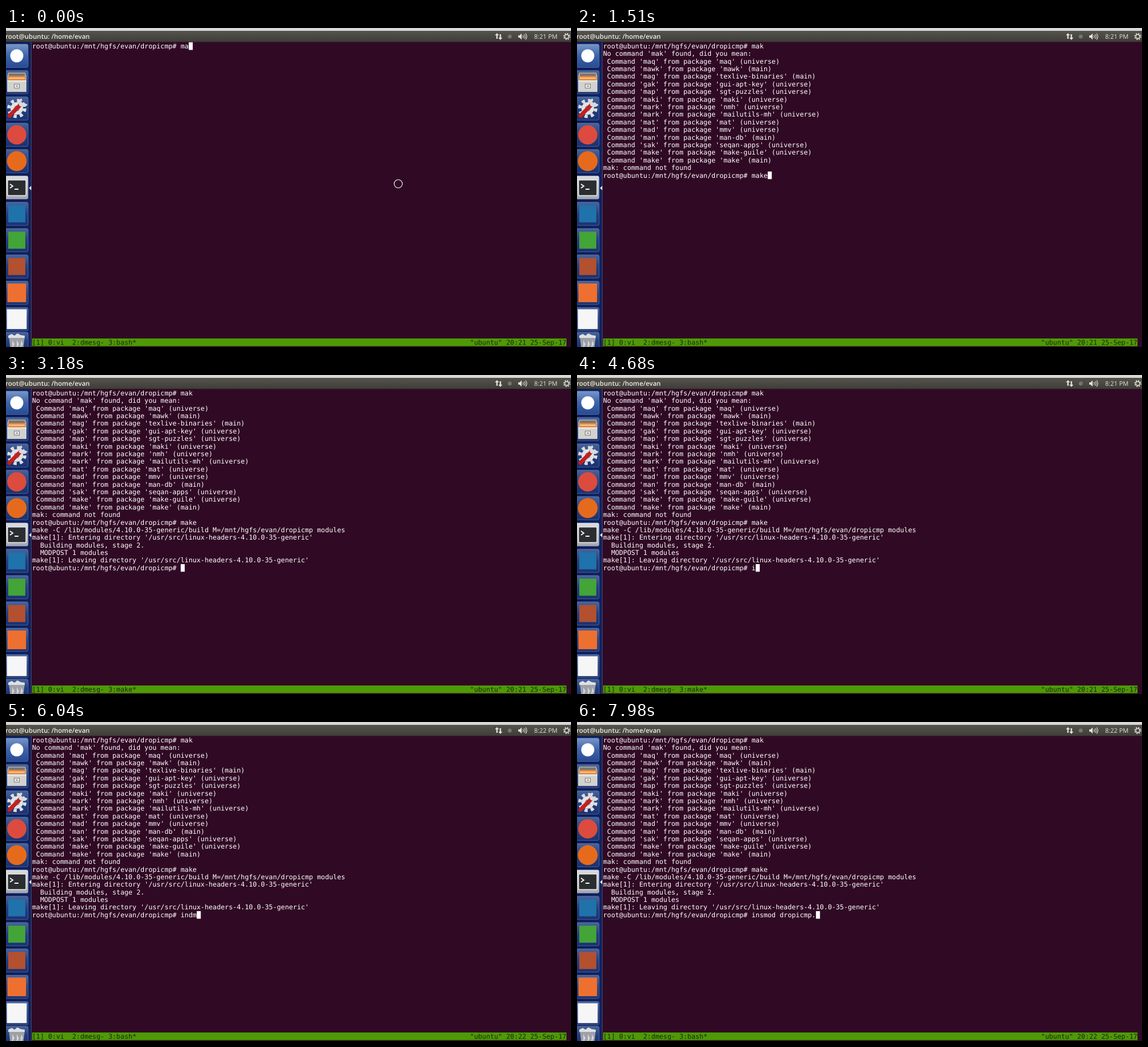
These frames come from a looping animation (996x562 px, 8000 ms). An HTML page:

```html
<!DOCTYPE html>
<html lang="en">
<head>
<meta charset="utf-8">
<title>Terminal session</title>
<style>
  html, body { margin: 0; width: 100%; height: 100%; overflow: hidden; background: #300a24; }
  svg { display: block; width: 996px; height: 562px; }
  text { white-space: pre; text-rendering: geometricPrecision; }
  .term text { font: 11.76px "DejaVu Sans Mono", monospace; fill: #fff; }
  .term .bar { fill: #17280a; }
  .panel text { font: 11px "Open Sans", sans-serif; fill: #e4e0d8; }
  .panel .title { font-size: 11.55px; font-weight: 600; fill: #f0ede6; }
</style>
</head>
<body>
<svg viewBox="0 0 996 562">
  <defs>
    <linearGradient id="top" x2="0" y2="1">
      <stop stop-color="#55534d"/><stop offset="1" stop-color="#3e3d38"/>
    </linearGradient>
    <linearGradient id="dock">
      <stop stop-color="#0b1c58"/><stop offset="1" stop-color="#10225f"/>
    </linearGradient>
    <linearGradient id="tile" x2="0" y2="1">
      <stop stop-color="#48649d"/><stop offset=".5" stop-color="#233f80"/><stop offset="1" stop-color="#1a3272"/>
    </linearGradient>
    <linearGradient id="blue" x2="0" y2="1">
      <stop stop-color="#7896c8"/><stop offset=".5" stop-color="#3c63a8"/><stop offset="1" stop-color="#274b94"/>
    </linearGradient>
    <linearGradient id="pale" x2="0" y2="1">
      <stop stop-color="#dcdde2"/><stop offset="1" stop-color="#a3a6b0"/>
    </linearGradient>
  </defs>

  <rect width="996" height="562" fill="#300a24"/>
  <rect width="996" height="5" fill="#d8d8d8"/>

  <g class="panel">
    <rect y="5" width="996" height="19.5" fill="url(#top)"/>
    <text class="title" x="-1" y="18.6">root@ubuntu: /home/evan</text>
    <text id="clock" x="931" y="18.8"></text>
    <g fill="#e4e0d8">
      <path d="M865.5 9l3.6 4h-2.4v6h-2.4v-6h-2.4zM871.5 21l-3.6-4h2.4v-6h2.4v6h2.4z"/>
      <path d="M903 13h2.5l3.5-3.5v11l-3.5-3.5h-2.5z"/>
      <circle cx="888" cy="15" r="3.5" fill="#77756e"/>
    </g>
    <g fill="none" stroke="#e4e0d8">
      <path d="M911 12.5q2 2.5 0 5M913.5 11q3.2 4 0 8M916 9.5q4.200 5.500 0 11" stroke-width="1.2"/>
      <circle cx="988.5" cy="15" r="3.4" stroke-width="1.5"/>
      <circle cx="988.5" cy="15" r="5.2" stroke-width="1.900" stroke-dasharray="2.042"/>
    </g>
  </g>

  <g id="launcher">
    <rect y="24.500" width="44" height="537.500" fill="url(#dock)"/>
    <rect x="44" y="24.500" width="1" height="537.500" fill="#4c4a70"/>
  </g>

  <g class="term">
    <g id="rows"></g>
    <rect id="cursor" width="7.100" height="13.400" fill="#fff"/>
    <rect x="46" y="547" width="942" height="13.500" fill="#4e9a06"/>
    <text id="tabs" class="bar" x="46" y="558"></text>
    <text id="date" class="bar" x="818.1" y="558"></text>
  </g>
  <circle id="pointer" cx="691.500" cy="274.500" r="7.200" fill="none" stroke="#fff" stroke-width="1.100"/>
</svg>

<script>
const LOOP = 8000, LEFT = 46, TOP = 25.2, CELL = 7.08, ROW = 13.39;
const $ = id => document.getElementById(id);

function add(parent, tag, attrs) {
  const el = document.createElementNS('http://www.w3.org/2000/svg', tag);
  for (const k in attrs) el.setAttribute(k, attrs[k]);
  return parent.appendChild(el);
}

// ---- launcher icons, each drawn around its own centre ----
const square = (size, color) => g =>
  add(g, 'rect', { x: -size / 2, y: -size / 2, width: size, height: size, fill: color });
const disc = (r, color) => g => add(g, 'circle', { r, fill: color });
const shapes = (...list) => g => list.forEach(([d, fill]) => add(g, 'path', { d, fill }));

const cabinet = shapes(
  ['M-15-17h30l2 6v28h-34v-28z', '#a9a9a6'],
  ['M-14-15h28v7h-28z', '#77736d'],
  ['M-15-11h30v8h-30z', '#e8873a'],
  ['M-14-8h28v2h-28z', '#f6d2a8'],
  ['M-17-3h34v20h-34z', '#d2d2cf'],
  ['M-17-3h34v2h-34z', '#efefec'],
  ['M-5 3h10v8h-10z', '#70706c'],
  ['M-4 4h8v6h-8z', '#f2f2f0'],
  ['M-2 6h4v2h-4z', '#8a8a86']
);

function settings(g) {
  add(g, 'circle', { r: 11, fill: '#e2e3e5' });
  add(g, 'circle', { r: 14, fill: 'none', stroke: '#dcdde0', 'stroke-width': 6, 'stroke-dasharray': 5.498 });
  add(g, 'circle', { r: 5, fill: '#8b93a8' });
  add(g, 'path', { d: 'M-13 13L6-6', stroke: '#c22020', 'stroke-width': 7, 'stroke-linecap': 'round' });
  add(g, 'path', { d: 'M5-5L10-10', stroke: '#d9dadc', 'stroke-width': 5 });
  add(g, 'path', { d: 'M9-16a6 6 0 1 0 8 8', fill: 'none', stroke: '#d9dadc', 'stroke-width': 4 });
}

function shell(g) {
  add(g, 'rect', { x: -17, y: -14, width: 34, height: 29, rx: 2, fill: '#f0f0f0' });
  add(g, 'rect', { x: -15.5, y: -12.5, width: 31, height: 26, rx: 1, fill: '#2b2e31' });
  add(g, 'path', { d: 'M-12-6l5 3.500l-5 3.500M-4 3h7', fill: 'none', stroke: '#fff', 'stroke-width': 1.8 });
}

const bin = shapes(
  ['M-14-6h28l-3 24h-22z', '#9da0a6'],
  ['M-15-8l6-3l5 3l5-4l6 3l7 1v4h-29z', '#dfe0e3'],
  ['M-8 0l4 7l-4 7zM0 0l4 7l-4 7zM8 0l3 7l-5 7z', '#d3d5d9']
);

const ICONS = [
  [disc(11.5, '#fff'), 'blue'], [cabinet], [settings], [disc(17, '#dc4b3e')],
  [disc(17.5, '#e66a1c')], [shell, 'pale'], [square(30, '#1f72aa')], [square(30, '#43a438')],
  [square(30, '#b3502f')], [square(33, '#ee7030')], [square(35, '#f6f6f6')], [bin]
];
ICONS.forEach(([draw, fill = 'tile'], i) => {
  const y = i < 11 ? 49 + 46.4 * i : 550;
  const g = add($('launcher'), 'g', { transform: `translate(19 ${y})` });
  const h = i < 11 ? 41 : 30;
  add(g, 'rect', {
    x: -21, y: i < 11 ? -20.5 : -14, width: 41, height: h, rx: 3,
    fill: `url(#${fill})`, stroke: '#7d8fb8', 'stroke-opacity': .55
  });
  draw(g);
});
add($('launcher'), 'path', { d: 'M44.500 278v8l-4-4z', fill: '#e8e8ee' });

// ---- terminal contents ----
const PROMPT = 'root@ubuntu:/mnt/hgfs/evan/dropicmp# ';
const KERNEL = "directory '/usr/src/linux-headers-4.10.0-35-generic'";
const HINTS = `maq maq universe|mawk mawk main|mag texlive-binaries main|gak gui-apt-key universe
map sgt-puzzles universe|maki maki universe|mark nmh universe|mark mailutils-mh universe
mat mat universe|mad mmv universe|man man-db main|sak seqan-apps universe
make make-guile universe|make make main`.split(/[|\n]/).map(s => {
  const [cmd, pkg, repo] = s.split(' ');
  return ` Command '${cmd}' from package '${pkg}' (${repo})`;
});
const LINES = [
  PROMPT + 'mak',
  "No command 'mak' found, did you mean:",
  ...HINTS,
  'mak: command not found',
  PROMPT + 'make',
  'make -C /lib/modules/4.10.0-35-generic/build M=/mnt/hgfs/evan/dropicmp modules',
  'make[1]: Entering ' + KERNEL,
  '  Building modules, stage 2.',
  '  MODPOST 1 modules',
  'make[1]: Leaving ' + KERNEL
];

// [time, finished lines, typed text (null = no prompt), cursor hidden]
const STEPS = [
  [0, 0, 'ma'], [150, 0, 'mak'], [480, 1, null], [620, 17, ''],
  [1070, 17, 'm'], [1210, 17, 'ma'], [1360, 17, 'mak'], [1510, 17, 'make'],
  [1660, 20, null], [2260, 20, null, true], [2850, 22, null],
  [3180, 23, ''], [3480, 23, '', true], [4080, 23, ''],
  [4680, 23, 'i'], [4830, 23, 'in'], [4980, 23, 'ind'], [5140, 23, 'indm'],
  [5300, 23, 'indmo'], [5460, 23, 'indmos'], [5610, 23, 'indmosd'],
  [5750, 23, 'indmos'], [5900, 23, 'indmo'], [6040, 23, 'indm'], [6190, 23, 'ind'],
  [6640, 23, 'in'], [6780, 23, 'ins'], [6930, 23, 'insmo'], [7080, 23, 'insmod'],
  [7230, 23, 'insmod '], [7680, 23, 'insmod d'], [7830, 23, 'insmod dr'],
  [7980, 23, 'insmod dropicmp.']
];

const rows = Array.from({ length: LINES.length + 1 }, (_, i) =>
  add($('rows'), 'text', { x: LEFT, y: TOP + ROW * i + 10.7 }));

function put(el, text) {
  if (el.textContent !== text) el.textContent = text;
}

function draw(t) {
  const [, done, typed, hidden] = STEPS.findLast(s => s[0] <= t);
  const tail = typed === null ? '' : PROMPT + typed;
  rows.forEach((el, i) => put(el, i < done ? LINES[i] : i === done ? tail : ''));

  const cursor = $('cursor');
  cursor.setAttribute('x', LEFT + tail.length * CELL);
  cursor.setAttribute('y', TOP + done * ROW);
  cursor.style.visibility = hidden ? 'hidden' : 'visible';
  $('pointer').style.visibility = t < 150 ? 'visible' : 'hidden';

  const job = t >= 2850 && t < 4830 ? 'make' : 'bash';
  put($('tabs'), `[1] 0:vi  2:dmesg- 3:${job}*`);
  put($('date'), `"ubuntu" 20:${t < 6040 ? 21 : 22} 25-Sep-17`);
  put($('clock'), `8:${t < 4980 ? 21 : 22} PM`);
}

const start = performance.now();
function tick() {
  draw((performance.now() - start) % LOOP);
  requestAnimationFrame(tick);
}
tick();
</script>
</body>
</html>
```
